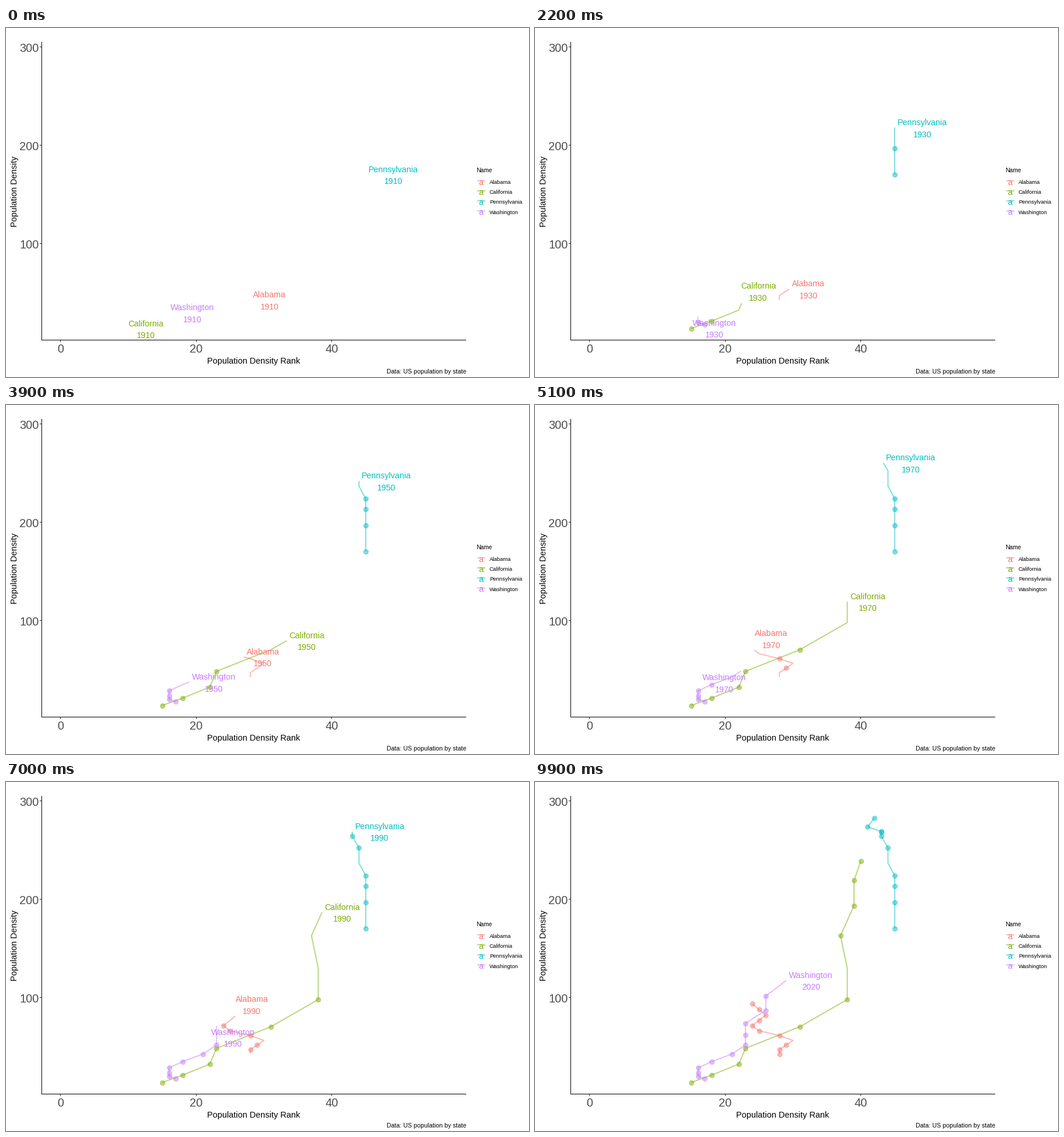
Recreate the animation shown at these times as a matplotlib script. Size 900 px wide and 600 px high, loop 10 s.

```python
import numpy as np
import matplotlib.pyplot as plt
from matplotlib.animation import FuncAnimation

plt.rcParams["font.family"] = "Liberation Sans"

W, H, DPI = 900, 600, 100
FRAMES, INTERVAL = 100, 100
DECADES = np.arange(12)     # 1910 to 2020
PER_DECADE = 9              # frames from one census to the next
LABEL_SIZE, LINE_STEP = 14.2, 20.5
LOWEST_LABEL = 518


def alabama(k):
    return 42.3 + 4.35 * k + 0.075 * k ** 2


def california(k):
    return 280 / (1 + np.exp(3 - 0.475 * k))


def pennsylvania(k):
    return 168.5 + 130 * (1 - np.exp(-k / 5)) + 4.5 * np.cos(2 * np.pi * (k - 1) / 5)


def washington(k):
    return 17.2 + 1.6 * k + 0.68 * k ** 2


# colour, density curve, turning points of the rank by decade
STATES = {
    "Alabama": ("#F8766D", alabama, {1: 28, 3: 30, 5: 25, 6: 24, 8: 26, 10: 24}),
    "California": ("#7CAE00", california,
                   {0: 14.8, 2: 22, 3: 23.2, 5: 38, 7: 37, 8: 39, 11: 40}),
    "Pennsylvania": ("#00BFC4", pennsylvania, {3: 45, 6: 43, 8: 43, 9: 41, 11: 42}),
    "Washington": ("#C77CFF", washington,
                   {0: 17, 1: 16, 3: 16, 6: 23, 8: 23, 9: 26, 10: 26, 11: 29}),
}


def px(size):
    return size * 72 / DPI


def to_x(rank):
    return 93.7 + 11.675 * rank


def to_y(density):
    return 539 - 1.69 * density


def reveal_frames():
    """Each point waits for the next row in text order of the row numbers."""
    count = len(DECADES)
    rows = sorted(range(1, len(STATES) * count + 1), key=str)
    shown = {rows[-1] - 1: FRAMES - 1}
    for row, after in zip(rows, rows[1:]):
        now, then = (row - 1) % count, (after - 1) % count
        if then > now:
            shown[row - 1] = then * PER_DECADE
    return shown


fig = plt.figure(figsize=(W / DPI, H / DPI), dpi=DPI, facecolor="white")
ax = fig.add_axes([0, 0, 1, 1])
ax.set(xlim=(0, W), ylim=(H, 0))
ax.axis("off")


def write(x, y, text, size, color="black", ha="left", **kw):
    return ax.text(x, y + 0.36 * size, text, fontsize=px(size), color=color,
                   ha=ha, va="baseline", **kw)


def rule(xs, ys, color="black", width=1, snap=False, **kw):
    return ax.plot(xs, ys, color=color, lw=px(width), snap=snap,
                   solid_capstyle="butt", **kw)[0]


def draw_axes():
    rule([61.5, 61.5], [24, 537])
    rule([61, 792], [536.5, 536.5])
    for value in (100, 200, 300):
        y = np.floor(to_y(value)) + 0.5
        rule([58, 61], [y, y], "#333333")
        write(56.5, y + 1.3, str(value), 20, "#4D4D4D", "right")
    for value in (0, 20, 40):
        x = np.floor(to_x(value)) + 0.5
        rule([x, x], [537, 540], "#333333")
        write(x, 550.5, str(value), 20, "#4D4D4D", "center")
    write(425.7, 571.8, "Population Density Rank", 14.5, ha="center")
    ax.text(22, 280.5, "Population Density", fontsize=px(14.5), rotation=90,
            ha="right", va="center")
    write(792, 589.7, "Data: US population by state", 10.6, ha="right")


def draw_legend():
    write(809, 244.3, "Name", 10.3)
    for i, (name, (color, *_)) in enumerate(STATES.items()):
        y = 264.2 + 17.3 * i
        rule([811, 825], [y - 1.5, y - 1.5], color, 2, alpha=0.5)
        write(817.3, y + 0.2, "a", LABEL_SIZE, color, "center")
        write(832, y, name, 9.5)


class Track:
    def __init__(self, index, name, reveal):
        color, density, turns = STATES[name]
        self.name = name
        self.last = index == len(STATES) - 1
        ranks = np.round(np.interp(DECADES, list(turns), list(turns.values())))
        self.xs, self.ys = to_x(ranks), to_y(density(DECADES))
        never = FRAMES
        self.starts = np.array([reveal.get(len(DECADES) * index + k, never)
                                for k in DECADES])
        self.line = rule([], [], color, 2, snap=None, alpha=0.5, zorder=3,
                         solid_joinstyle="round")
        self.dots, = ax.plot([], [], "o", color=color, alpha=0.5, ms=px(8),
                             mew=px(1), zorder=4)
        self.texts = [write(0, 0, text, LABEL_SIZE, color, "center", zorder=5)
                      for text in (name, "")]
        self.half = self.texts[0].get_window_extent().width / 2

    def move(self, frame):
        # only the last state keeps its head when the range is complete
        self.live = frame < FRAMES - 1 or self.last
        t = frame / PER_DECADE
        self.x, self.y = (np.interp(t, DECADES, v) for v in (self.xs, self.ys))
        past = DECADES < t
        head = ([self.x], [self.y]) if self.live else ([], [])
        self.line.set_data(np.append(self.xs[past], head[0]),
                           np.append(self.ys[past], head[1]))
        seen = self.starts <= frame
        self.dots.set_data(self.xs[seen], self.ys[seen])
        self.texts[1].set_text(str(1910 + 10 * int(t + 0.5)))

    def collides(self, other):
        gap = abs(self.x + self.half - other.x - other.half)
        return (gap < self.half + other.half + 2
                and abs(self.y - other.y) < 2 * LINE_STEP)

    def place(self, tracks):
        """Label right of the head; colliding labels part above and below."""
        rivals = [o for o in tracks if o is not self and o.live and self.collides(o)]
        if not rivals:
            x, y = self.x + self.half + 4.7, self.y + 0.8
        else:
            other = min(rivals, key=lambda o: np.hypot(o.x - self.x, o.y - self.y))
            above = self.y < other.y
            crowded = not above and 0 < other.x - self.x < 25
            x = self.x + (-28.5 if crowded else 28.5)
            y = min(self.y + (-19.4 if above else 20.7), LOWEST_LABEL)
        for text, side in zip(self.texts, (-0.5, 0.5)):
            text.set_position((x, y + side * LINE_STEP + 0.36 * LABEL_SIZE))
            text.set_visible(self.live)


draw_axes()
draw_legend()
reveal = reveal_frames()
tracks = [Track(i, name, reveal) for i, name in enumerate(STATES)]


def update(frame):
    for track in tracks:
        track.move(frame)
    for track in tracks:
        track.place(tracks)
    return [a for t in tracks for a in (t.line, t.dots, *t.texts)]


anim = FuncAnimation(fig, update, frames=FRAMES, interval=INTERVAL,
                     repeat=True, repeat_delay=0, blit=False)
plt.show()
```
